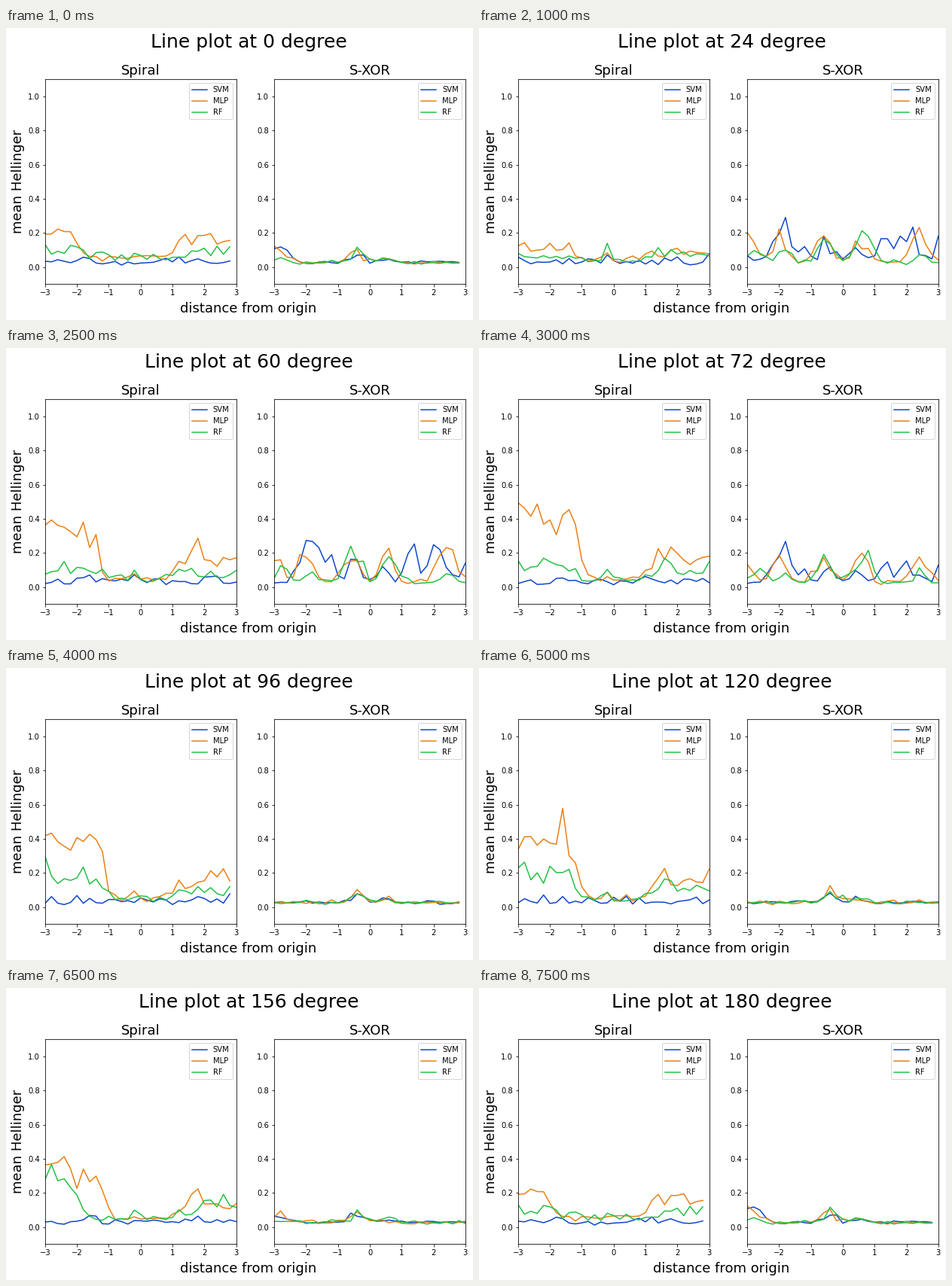
Write a matplotlib script that moves like this. It is 620 px wide and 388 px high and loops after 8 s.

```python
import matplotlib.pyplot as plt
import numpy as np
from matplotlib.animation import FuncAnimation

W, H, DPI = 620, 388, 72
STEP, FRAMES, INTERVAL = 12, 16, 500
MODELS = {"SVM": "#0b44cc", "MLP": "#ea7f12", "RF": "#22c043"}
PANELS = ("Spiral", "S-XOR")
OPEN_ENDED = (0, 12, 84, 96, 180)  # angles sampled only up to 2.8
distance = np.linspace(-3, 3, 31)

# Spiral: how the plateaus left and right of the core vary with the angle.
KEY_ANGLES = (0, 24, 48, 72, 120, 156, 180)
PLATEAUS = {
    "MLP": dict(left=(0.20, 0.11, 0.23, 0.42, 0.38, 0.33, 0.20),
                edge=(-1.9, -1.2, -1.6, -1.1, -1.1, -1.1, -1.9),
                right=(0.17, 0.10, 0.16, 0.18, 0.165, 0.145, 0.17)),
    "RF": dict(left=(0.085, 0.06, 0.075, 0.13, 0.22, 0.29, 0.085),
               edge=(-1.1, -1.1, -1.1, -1.1, -1.1, -1.9, -1.1),
               right=(0.08, 0.08, 0.07, 0.09, 0.12, 0.12, 0.08)),
}
# S-XOR: bumps as (centre, width, height) where the angle brings them out.
BUMPS = {
    "SVM": [(-1.9, 0.35, 0.27), (-1.2, 0.2, 0.13), (-0.45, 0.2, 0.07),
            (0.4, 0.2, 0.07), (1.3, 0.25, 0.17), (2.1, 0.4, 0.18),
            (3, 0.15, 0.12)],
    "MLP": [(-3, 0.3, 0.12), (-2, 0.28, 0.20), (-0.7, 0.3, 0.14),
            (0.55, 0.28, 0.17), (2.4, 0.35, 0.22)],
    "RF": [(-2.7, 0.3, 0.08), (-1.8, 0.25, 0.08), (-0.6, 0.3, 0.13),
           (0.65, 0.35, 0.14), (2.5, 0.2, 0.07)],
}
ROUGHNESS = {"SVM": 0.45, "MLP": 0.2, "RF": 0.25}


def bump(center, width, height):
    return height * np.exp(-((distance - center) / width) ** 2)


def rise(offset):
    return 1 / (1 + np.exp(-offset / 0.1))


def spiral(model, angle):
    core = np.full(distance.shape, 0.032 if model == "SVM" else 0.045)
    if model == "SVM":
        return core
    left, edge, right = (np.interp(angle, KEY_ANGLES, PLATEAUS[model][key])
                         for key in ("left", "edge", "right"))
    peak = bump(-0.2, 0.15, 0.05 if model == "RF" else 0.02)
    return (core + peak + (left - core) * rise(edge - distance)
            + (right - core) * rise(distance - 1))


def s_xor(model, angle):
    strength = np.clip(1.25 * np.sin(np.radians(2 * angle)), 0, 1)
    near_axis = abs(np.cos(np.radians(angle))) ** 12
    base = 0.026 + bump(-0.4, 0.3, 0.055) + bump(0.5, 0.3, 0.02)
    base += near_axis * bump(-3, 0.5, 0.03 if model == "RF" else 0.1)
    return base + strength * sum(bump(*b) for b in BUMPS[model])


def curves_at(angle):
    """Heights of every curve, roughened by noise that is fixed per angle."""
    angle %= 180
    rng = np.random.default_rng(angle)
    for panel, shape in zip(PANELS, (spiral, s_xor)):
        for model, roughness in ROUGHNESS.items():
            if panel == "S-XOR":
                roughness = 0.22
            noise = rng.standard_normal(distance.shape)
            yield panel, model, shape(model, angle) * np.exp(roughness * noise)


fig = plt.figure(figsize=(W / DPI, H / DPI), dpi=DPI, facecolor="white")


def label(x, y, text, size, **style):
    return fig.text(x / W, 1 - y / H, text, fontsize=size, ha="center",
                    va="baseline", **style)


title = label(322.5, 26, "", 25)
label(321.5, 378, "distance from origin", 18)
label(21, 204, "mean Hellinger", 18, rotation=90, rotation_mode="anchor")

lines = {}
for panel, left in zip(PANELS, (51.9, 356.2)):
    ax = fig.add_axes([left / W, 47.8 / H, 253.64 / W, 271.8 / H])
    ax.set(xlim=(-3, 3), ylim=(-0.1, 1.1), xticks=range(-3, 4))
    ax.set_title(panel, fontsize=18)
    for model, color in MODELS.items():
        lines[panel, model], = ax.plot([], [], color=color, label=model)
    ax.legend(loc="upper right")


def update(frame):
    angle = frame * STEP
    title.set_text(f"Line plot at {angle} degree")
    count = len(distance) - (angle in OPEN_ENDED)
    for panel, model, heights in curves_at(angle):
        lines[panel, model].set_data(distance[:count], heights[:count])
    return [title, *lines.values()]


anim = FuncAnimation(fig, update, frames=FRAMES, interval=INTERVAL,
                     repeat=True, repeat_delay=0)
plt.show()
```
